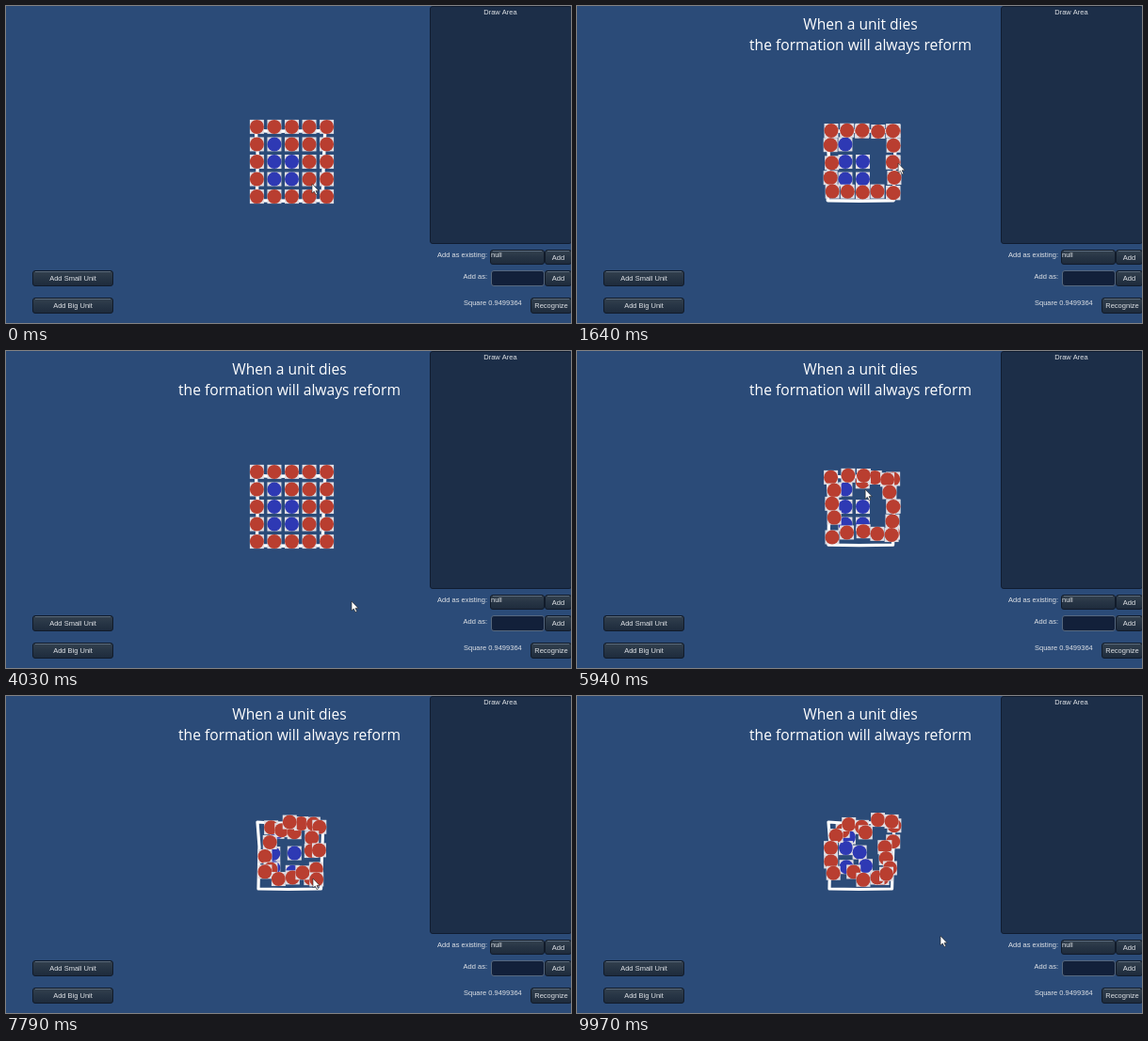
Animation of 600 by 337 pixels, one loop 10000 ms. Source, as an HTML page with a canvas:

```html
<!DOCTYPE html>
<html lang="en">
<head>
<meta charset="utf-8">
<title>Unit formation</title>
<style>
html, body { margin: 0; width: 100%; height: 100%; overflow: hidden; background: #2b4b78; }
canvas { display: block; }
</style>
</head>
<body>
<canvas id="stage" width="600" height="337"></canvas>
<script>
const ctx = document.getElementById('stage').getContext('2d');
const LOOP = 10000;
const CENTER = { x: 303.5, y: 165.5 };
const SPACING = 18.55;
const UI_FONT = '7.5px "Liberation Sans", Arial, sans-serif';
const CAPTION_FONT = '15.6px "Open Sans", "Noto Sans", sans-serif';

const clamp = v => Math.min(1, Math.max(0, v));
const ramp = (t, from, to) => clamp((t - from) / (to - from));

// Repeatable noise between -1 and 1.
function noise(seed) {
  const v = Math.sin(seed * 127.1 + 31.7) * 43758.5453;
  return 2 * (v - Math.floor(v)) - 1;
}

// 5 x 5 formation, offsets from the center; a small triangle of blue units inside.
const units = [];
for (let row = -2; row <= 2; row++) {
  for (let col = -2; col <= 2; col++) {
    const blue = col === -1 && Math.abs(row) < 2 || col === 0 && (row === 0 || row === 1);
    units.push({ x: col * SPACING, y: row * SPACING, blue });
  }
}
units.sort((a, b) => b.blue - a.blue);

// Each regrouping draws the red units towards a square ring, then back home.
const regroupings = [
  { start: 1150, peak: 1640, end: 2750, ring: 33, spread: 1.5, blueSpread: 0 },
  { start: 5250, peak: 5940, end: 6850, ring: 30, spread: 4, blueSpread: 0 },
  { start: 7250, peak: 7790, end: 8750, ring: 26, spread: 6, blueSpread: 4 },
  { start: 9100, peak: 9970, end: 11000, ring: 27, spread: 7, blueSpread: 5 }
];

function unitPosition(unit, index, t) {
  let { x, y } = unit;
  regroupings.forEach((g, k) => {
    const amount = Math.min(ramp(t, g.start, g.peak), 1 - ramp(t, g.peak, g.end));
    const radius = Math.max(Math.abs(x), Math.abs(y)) || 1;
    const scale = unit.blue ? 1 : 1 + (g.ring / radius - 1) * amount;
    const spread = (unit.blue ? g.blueSpread : g.spread) * amount;
    const seed = index * 2 + k * 60;
    x = x * scale + noise(seed) * spread;
    y = y * scale + noise(seed + 1) * spread;
  });
  return { x: CENTER.x + x, y: CENTER.y + y };
}

function drawUnit(unit, index, t) {
  const { x, y } = unitPosition(unit, index, t);
  ctx.fillStyle = '#e0dde2';
  ctx.fillRect(x - 7.5, y - 7.5, 15, 15);
  ctx.fillStyle = unit.blue ? '#2e39b4' : '#b93e30';
  ctx.beginPath();
  ctx.arc(x, y, 7.5, 0, 2 * Math.PI);
  ctx.fill();
}

// Stops of the mouse: time, x, y.
const cursorStops = [
  [0, 326, 189], [1640, 342, 167], [2050, 403, 280], [3100, 403, 280], [3700, 368, 266], [5250, 368, 266],
  [5940, 307, 147], [6600, 408, 264], [7790, 327, 194], [9000, 327, 194], [9970, 387, 255], [LOOP, 387, 255]
];
const arrow = new Path2D('M0 0V10L2.3 8L4 11.6L5.6 10.9L4 7.4H7Z');

function drawCursor(t) {
  const next = cursorStops.findIndex(stop => stop[0] > t);
  const [t0, x0, y0] = cursorStops[next - 1];
  const [t1, x1, y1] = cursorStops[next];
  const f = ramp(t, t0, t1);
  ctx.save();
  ctx.translate(x0 + (x1 - x0) * f - 1, y0 + (y1 - y0) * f);
  ctx.fillStyle = '#fff';
  ctx.fill(arrow);
  ctx.strokeStyle = '#222';
  ctx.lineWidth = .6;
  ctx.stroke(arrow);
  ctx.restore();
}

// Hand-drawn square that settles to a slightly smaller size.
const outline = new Path2D('M267 134L282 135L337 134.5L335.5 170L334.5 205L300 205.5L268 205L269 160Z');

function drawOutline(t) {
  const scale = 1.05 - .05 * ramp(t, 5000, 7500);
  ctx.save();
  ctx.translate(302, 170);
  ctx.scale(scale, scale);
  ctx.translate(-302, -170);
  ctx.strokeStyle = '#fff';
  ctx.lineWidth = 3.2;
  ctx.lineJoin = 'round';
  ctx.stroke(outline);
  ctx.restore();
}

function label(text, x, y, align = 'left') {
  ctx.font = UI_FONT;
  ctx.textAlign = align;
  ctx.fillStyle = '#dfe2e6';
  ctx.fillText(text, x, y);
}

function box(x, y, w, h, fill, stroke) {
  ctx.beginPath();
  ctx.roundRect(x + .5, y + .5, w - 1, h - 1, 2.5);
  ctx.fillStyle = fill;
  ctx.fill();
  ctx.strokeStyle = stroke;
  ctx.lineWidth = 1;
  ctx.stroke();
}

function button(text, x, y, w, h = 17) {
  const shade = ctx.createLinearGradient(0, y, 0, y + h);
  shade.addColorStop(0, '#35424f');
  shade.addColorStop(.5, '#273545');
  shade.addColorStop(1, '#1d2a3b');
  box(x, y, w, h, shade, '#111b2a');
  ctx.fillStyle = '#5b6b7c';
  ctx.fillRect(x + 3, y + 1, w - 6, 1);
  label(text, x + w / 2, y + h / 2 + 2.7, 'center');
}

function drawInterface() {
  box(450, 0, 151, 253, '#1c2e48', '#101d31');
  label('Draw Area', 525, 9, 'center');
  button('Add Small Unit', 28, 281, 86);
  button('Add Big Unit', 28, 310, 86);
  label('Add as existing:', 511, 267, 'right');
  button('', 514, 259, 58, 16);
  label('null', 515, 267);
  button('Add', 572, 259, 29, 16);
  label('Add as:', 511, 289.5, 'right');
  box(515, 281, 57, 17, '#12203a', '#56687f');
  button('Add', 572, 281, 29);
  label('Square 0.9499364', 486, 318);
  button('Recognize', 557, 310, 44);
}

function drawCaption(t) {
  ctx.globalAlpha = ramp(t, 100, 800);
  ctx.font = CAPTION_FONT;
  ctx.textAlign = 'center';
  ctx.fillStyle = '#fff';
  ctx.fillText('When a unit dies', 301, 25);
  ctx.fillText('the formation will always reform', 301, 46.5);
  ctx.globalAlpha = 1;
}

function draw(t) {
  ctx.fillStyle = '#2b4b78';
  ctx.fillRect(0, 0, 600, 337);
  drawInterface();
  drawOutline(t);
  units.forEach((unit, i) => drawUnit(unit, i, t));
  drawCaption(t);
  drawCursor(t);
}

const begin = performance.now();
function tick() {
  draw((performance.now() - begin) % LOOP);
  requestAnimationFrame(tick);
}
tick();
</script>
</body>
</html>
```
